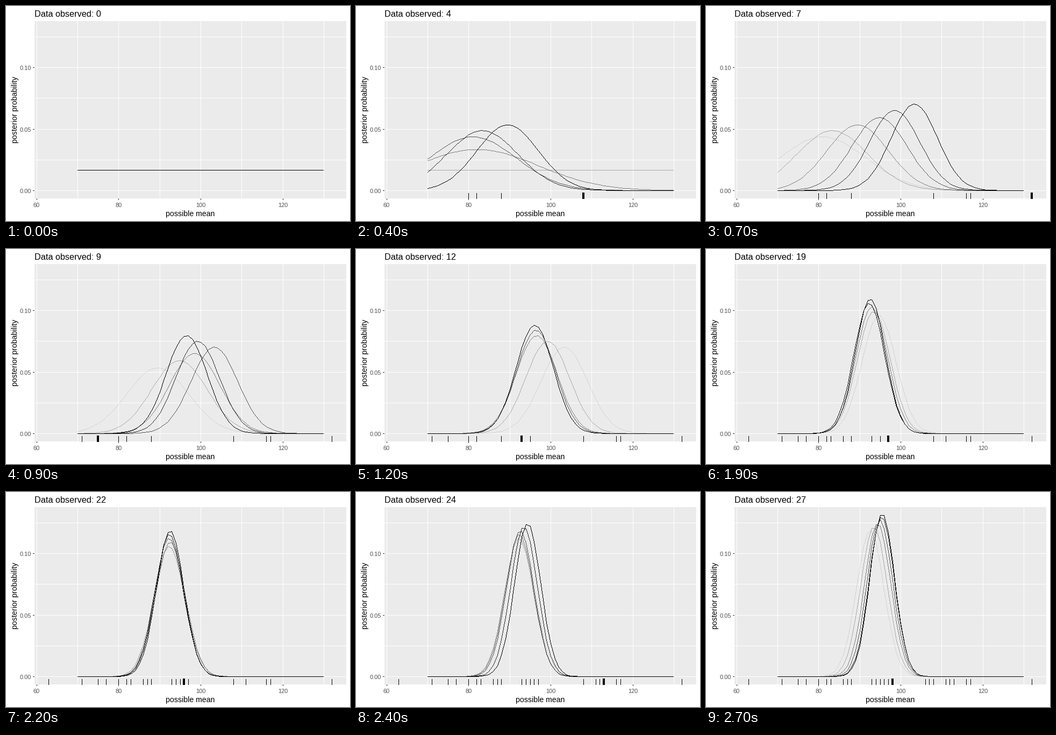
These frames come from a looping animation (640x400 px, 2800 ms). A matplotlib script:

```python
import numpy as np
import matplotlib.pyplot as plt
from matplotlib.animation import FuncAnimation
from matplotlib.patches import Rectangle

W, H, DPI = 640, 400, 100
LEFT, RIGHT, TOP, BOTTOM = 53, 633, 28, 358
SIGMA = 15
FRAMES, INTERVAL = 28, 100
WAKE = 0.2 * FRAMES

# Observations in order of arrival; a repeated value adds no information.
DATA = [82, 80, 88, 108, 116, 117, 132, 71, 75, 95, 93, 93, 111, 63, 77,
        86, 83, 95, 97, 87, 94, 96, 112, 113, 107, 106, 98]
MEANS = np.arange(70, 131)


def px(v):
    return 133.4 + 7.633 * (v - 70)


def py(p):
    return 343.3 - 2285 * p


def posterior(n):
    seen = np.array(sorted(set(DATA[:n])), dtype=float)
    logp = -((seen[:, None] - MEANS) ** 2).sum(axis=0) / (2 * SIGMA ** 2)
    p = np.exp(logp - logp.max())
    return p / p.sum()


def trace(xs, ys):
    """Rows and columns of a one pixel wide line through whole-pixel points."""
    cols, rows = [], []
    for x0, y0, x1, y1 in zip(xs, ys, xs[1:], ys[1:]):
        steps = max(abs(x1 - x0), abs(y1 - y0))
        t = np.arange(steps) / steps
        cols.append(np.floor(x0 + (x1 - x0) * t + 0.5))
        rows.append(np.floor(y0 + (y1 - y0) * t + 0.5))
    return (np.concatenate(rows).astype(int),
            np.concatenate(cols).astype(int))


CURVE_X = np.floor(px(MEANS)).astype(int)
CURVES = [trace(CURVE_X, np.floor(py(posterior(n))).astype(int))
          for n in range(FRAMES)]

plt.rcParams["font.family"] = "Liberation Sans"
fig = plt.figure(figsize=(W / DPI, H / DPI), dpi=DPI, facecolor="white")
ax = fig.add_axes([0, 0, 1, 1])
ax.axis("off")


def box(x, y, w, h, color, z=1):
    patch = Rectangle((x, y), w, h, fc=color, lw=0, antialiased=False,
                      snap=False, zorder=z)
    return ax.add_patch(patch)


def label(x, y, s, size, color="black", **kw):
    return ax.text(x, y, s, fontsize=size * 72 / DPI, color=color,
                   va="baseline", **kw)


box(LEFT, TOP, RIGHT - LEFT, BOTTOM - TOP, "#ebebeb", 0)

for v in range(60, 131, 10):
    x = int(px(v))
    box(x, TOP, 1, BOTTOM - TOP, "white")
    if v % 20 == 0:
        box(x, BOTTOM, 1, 3, "#333333")
        label(px(v), 374, str(v), 11, "#4d4d4d", ha="center")

for k in range(6):
    p = 0.025 * k
    y = int(py(p))
    box(LEFT, y, RIGHT - LEFT, 1, "white")
    if k % 2 == 0:
        box(LEFT - 3, y, 3, 1, "#333333")
        label(47.5, y + 5, f"{p:.2f}", 11, "#4d4d4d", ha="right")

label(342.5, 391, "possible mean", 14.1, ha="center")
label(21.5, 193, "posterior probability", 14.1, ha="center",
      rotation=90, rotation_mode="anchor")
title = label(LEFT, 20, "", 16.3)

ink = np.zeros((H, W, 4))
curves = ax.imshow(ink, extent=(0, W, H, 0), aspect="auto",
                   interpolation="nearest", zorder=3)
rug = [box(int(px(v)), 348, 1, 11, "black", 4) for v in DATA]
newest = box(0, 347, 4, 12, "black", 5)
ax.set_xlim(0, W)
ax.set_ylim(H, 0)


def update(n):
    title.set_text(f"Data observed: {n}")
    ink = np.zeros((H, W, 4))
    for age in range(min(n, int(WAKE)) + 1):
        rows, cols = CURVES[n - age]
        alpha = ink[rows, cols, 3]
        ink[rows, cols, 3] = alpha + (1 - alpha) * (1 - age / WAKE)
    curves.set_data(ink)
    for i, tick in enumerate(rug):
        tick.set_visible(i < n)
    newest.set_visible(n > 0)
    if n:
        newest.set_x(int(px(DATA[n - 1])) - 2)
    return [title, newest, curves, *rug]


anim = FuncAnimation(fig, update, frames=FRAMES, interval=INTERVAL,
                     repeat=True, repeat_delay=0, blit=False)
plt.show()
```
